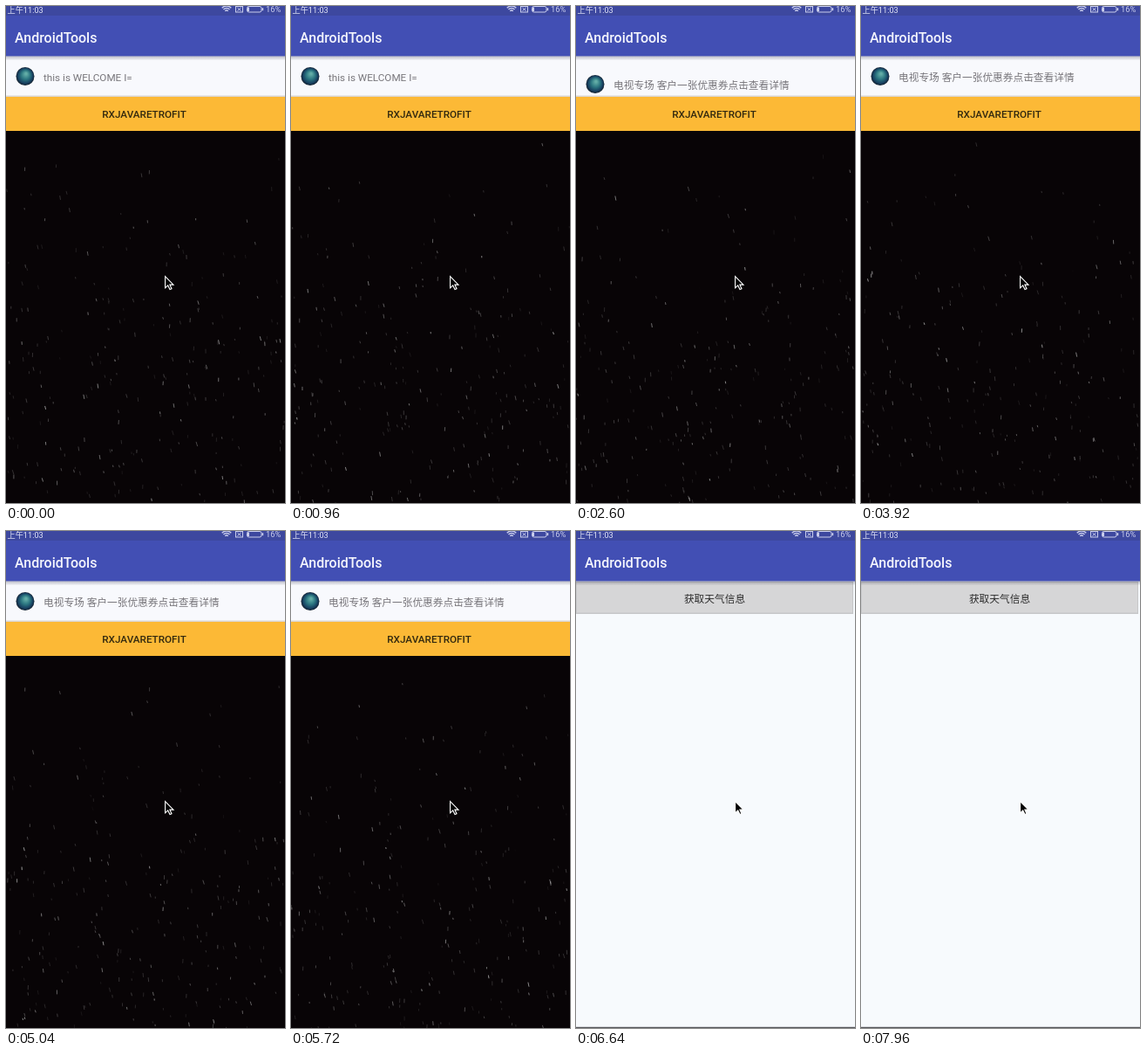
Animation of 320 by 569 pixels, one loop 8 s. Source, as an HTML page with a canvas:

```html
<!DOCTYPE html>
<html lang="zh">
<head>
<meta charset="utf-8">
<title>App screen</title>
<style>
html, body { margin: 0; width: 100%; height: 100%; overflow: hidden; background: #080406; }
canvas { display: block; width: 100vw; height: 100vh; }
</style>
</head>
<body>
<canvas id="stage"></canvas>
<script>
const W = 320, H = 569, LOOP = 8000;
const FLIP = { start: 1800, length: 1000, height: 45 };
const SLIDE = { start: 5822, length: 400, parallax: 71 };
const NIGHT = '#080406';
const SANS = 'Roboto, "Noto Sans CJK SC", "Noto Sans CJK", sans-serif';
const canvas = document.getElementById('stage');
const ctx = canvas.getContext('2d');

const clamp = v => Math.max(0, Math.min(1, v));
const progress = (t, span) => clamp((t - span.start) / span.length);

function seeded(seed) {
  return () => {
    seed = (seed * 1664525 + 1013904223) >>> 0;
    return seed / 4294967296;
  };
}

const rand = seeded(71);
const flakes = Array.from({ length: 260 }, () => ({
  x: rand() * W,
  top: 150 + rand() * 260,
  speed: 38 + rand() * 50,
  phase: rand(),
  slope: 0.12 + (rand() - 0.5) * 0.4,
  size: 2 + rand() * 3.2,
  light: 0.2 + Math.pow(rand(), 2) * 0.5,
  beat: 2 + rand() * 5
}));

function rect(x, y, w, h, fill) {
  ctx.fillStyle = fill;
  ctx.fillRect(x, y, w, h);
}

function text(str, x, y, size, fill, weight = 400, align = 'left') {
  ctx.font = `${weight} ${size}px ${SANS}`;
  ctx.textAlign = align;
  ctx.fillStyle = fill;
  ctx.fillText(str, x, y);
}

function fade(y, h, alpha) {
  const g = ctx.createLinearGradient(0, y, 0, y + h);
  g.addColorStop(0, `rgba(40,40,60,${alpha})`);
  g.addColorStop(1, 'rgba(40,40,60,0)');
  rect(0, y, W, h, g);
}

function drawFlakes(t) {
  ctx.lineWidth = 0.9;
  for (const f of flakes) {
    const range = H + 6 - f.top;
    const fallen = (f.phase * range + f.speed * t / 1000) % range;
    const y = f.top + fallen;
    const x = (f.x + f.slope * fallen + W) % W;
    const twinkle = 0.7 + 0.3 * Math.sin(f.beat * t / 1000 + f.phase * 40);
    ctx.strokeStyle = `rgba(235,235,235,${f.light * twinkle * clamp(fallen / 6)})`;
    ctx.beginPath();
    ctx.moveTo(x, y);
    ctx.lineTo(x + f.size * f.slope, y + f.size);
    ctx.stroke();
  }
}

function drawGlobe(x, y) {
  const g = ctx.createRadialGradient(x + 1, y - 3, 1, x, y, 10.5);
  g.addColorStop(0, '#62ada6');
  g.addColorStop(0.45, '#2b7580');
  g.addColorStop(0.8, '#173f60');
  g.addColorStop(1, '#14202c');
  ctx.fillStyle = g;
  ctx.beginPath();
  ctx.arc(x, y, 10.5, 0, Math.PI * 2);
  ctx.fill();
}

function drawTicker(t) {
  const shift = progress(t, FLIP) * FLIP.height;
  const rows = ['this is WELCOME I=', '电视专场 客户一张优惠券点击查看详情'];
  rect(0, 57, W, 47, '#f8f9fd');
  ctx.save();
  ctx.beginPath();
  ctx.rect(0, 58, W, 45);
  ctx.clip();
  rows.forEach((row, i) => {
    const y = 81 + i * FLIP.height - shift;
    drawGlobe(22, y - 0.5);
    text(row, 43, y + 4.7, 11.7, '#77757a');
  });
  ctx.restore();
  rect(0, 102.5, W, 1.5, '#dcd6d0');
}

function drawToolbar() {
  rect(0, 0, W, 57.5, '#424fb4');
  rect(0, 0, W, 11, '#3d489f');
  text('AndroidTools', 10, 41.5, 16, '#f4f5fd', 500);
  fade(57.5, 5, 0.28);
}

function drawHome(t) {
  rect(0, 0, W, H, NIGHT);
  drawFlakes(t);
  drawTicker(t);
  rect(0, 104, W, 39, '#fcb936');
  text('RXJAVARETROFIT', 158.5, 128.3, 11.7, '#33290f', 500, 'center');
  drawToolbar();
}

function drawWeather() {
  rect(0, 0, W, H, '#f7fafd');
  rect(0, 58, 318, 37, '#c6c7c9');
  rect(1, 59, 316, 34.5, '#d6d6d7');
  text('获取天气信息', 159, 82, 11.7, '#2c2c2c', 500, 'center');
  drawToolbar();
  rect(0, H - 1.2, W, 1.2, '#55565a');
}

function drawStatus() {
  const pale = '#c9cdec';
  text('上午11:03', 1.5, 7.6, 9.2, '#e3e6f7');
  text('16%', 298, 7.4, 9.3, pale);
  ctx.strokeStyle = pale;
  ctx.lineWidth = 1.3;
  for (const r of [2.5, 5, 7.5]) {
    ctx.beginPath();
    ctx.arc(253, 7.5, r, -Math.PI * 0.75, -Math.PI * 0.25);
    ctx.stroke();
  }
  ctx.lineWidth = 1;
  ctx.strokeRect(263.5, 0.5, 8, 6.5);
  ctx.beginPath();
  ctx.moveTo(265.5, 2);
  ctx.lineTo(269.5, 5.5);
  ctx.moveTo(269.5, 2);
  ctx.lineTo(265.5, 5.5);
  ctx.stroke();
  ctx.beginPath();
  ctx.roundRect(276.5, 0.5, 16.5, 6.5, 2);
  ctx.stroke();
  rect(277, 1.5, 2, 4.5, pale);
  rect(293.5, 2.2, 1.7, 3, pale);
}

function drawCursor() {
  const arrow = new Path2D('M182.6 309.5V322.8L185.7 319.9L188 324.6L190 323.7L187.9 319.1H192Z');
  ctx.fillStyle = '#050505';
  ctx.strokeStyle = '#fff';
  ctx.lineWidth = 1.1;
  ctx.fill(arrow);
  ctx.stroke(arrow);
}

function drawScreen(t) {
  const p = progress(t, SLIDE);
  const slide = 1 - (1 - p) * (1 - p);
  const edge = W * (1 - slide);
  if (p < 1) {
    ctx.save();
    ctx.translate(-SLIDE.parallax * slide, 0);
    drawHome(t);
    ctx.restore();
    if (p > 0) rect(0, 0, edge, H, `rgba(0,0,0,${0.45 * slide})`);
  }
  if (p > 0) {
    ctx.save();
    ctx.translate(edge, 0);
    drawWeather();
    ctx.restore();
  }
  drawStatus();
  drawCursor();
}

function resize() {
  const ratio = window.devicePixelRatio || 1;
  canvas.width = Math.round(innerWidth * ratio);
  canvas.height = Math.round(innerHeight * ratio);
}

const origin = performance.now();
function tick() {
  ctx.setTransform(canvas.width / W, 0, 0, canvas.height / H, 0, 0);
  drawScreen((performance.now() - origin) % LOOP);
  requestAnimationFrame(tick);
}

addEventListener('resize', resize);
resize();
tick();
</script>
</body>
</html>
```
